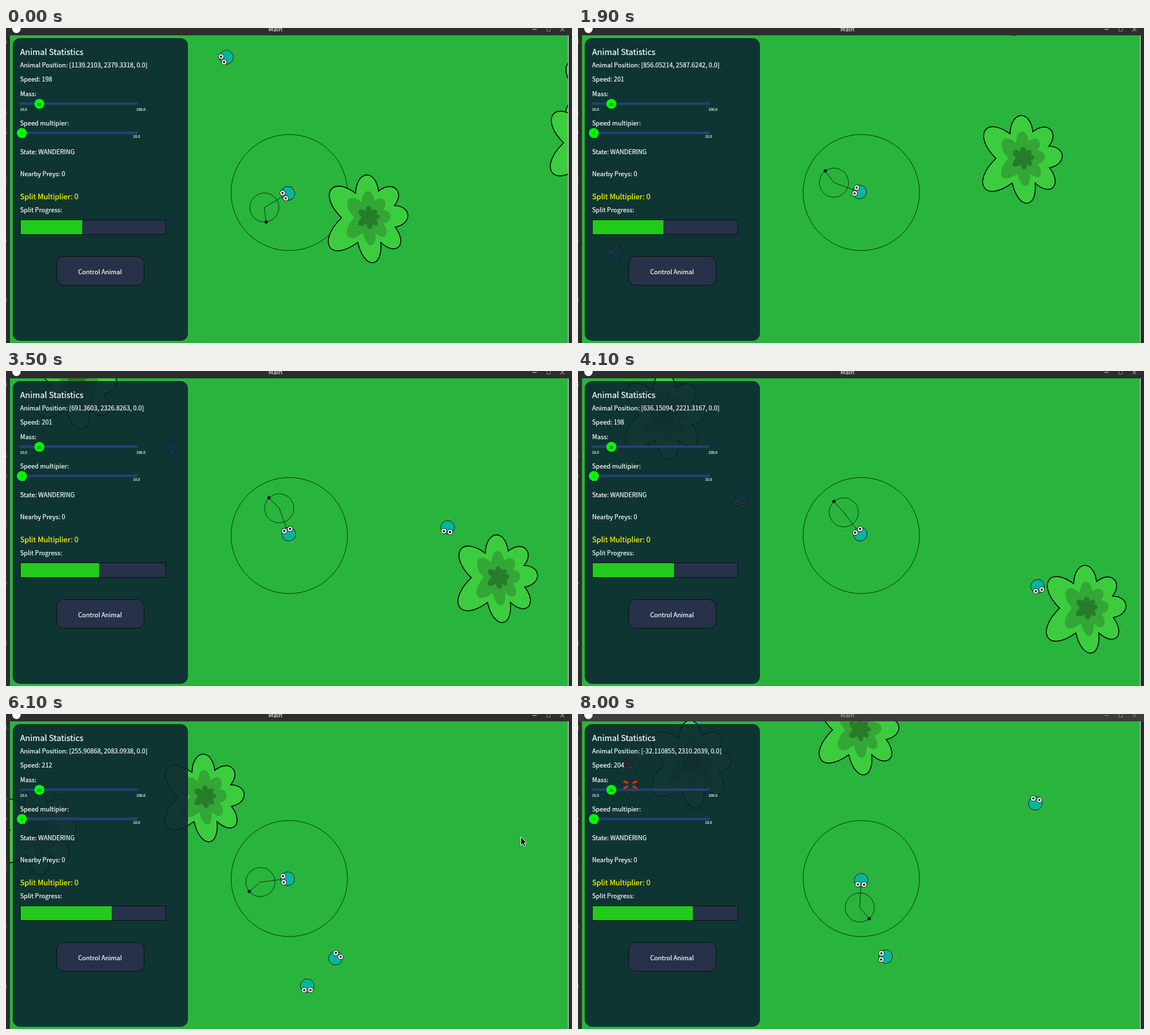
These frames come from a looping animation (1002 px wide and 559 px high, 8100 ms). An HTML page with a canvas:

```html
<!DOCTYPE html>
<html lang="en">
<head>
<meta charset="utf-8">
<title>Main</title>
<style>
html, body { margin: 0; width: 100%; height: 100%; overflow: hidden; background: #2b2b2b; }
canvas { display: block; width: 1002px; height: 559px; }
</style>
</head>
<body>
<canvas id="stage" width="1002" height="559"></canvas>
<script>
const ctx = document.getElementById('stage').getContext('2d');
const LOOP = 8100, STEP = 100, SCALE = 0.515, TAU = Math.PI * 2, RAD = Math.PI / 180;
const CENTER = { x: 501.5, y: 292 };
const FONT = '"Noto Sans CJK SC", "Noto Sans CJK JP", "Noto Sans", sans-serif';
const INK = '#06210a';

// Moments (seconds) at which the paths below have a waypoint
const TIMES = [0, 1.1, 2.8, 4.1, 5.2, 6.1, 8];
const HERO_SPEED = 205;
const heroKeys = [
  { x: 1139.2103, y: 2379.3318, heading: 149, wander: 83, speed: 198 },
  { x: 988.47925, y: 2556.5457, heading: 129, wander: 243, speed: 198 },
  { x: 733.77966, y: 2461.1333, heading: 252, wander: 223, speed: 204 },
  { x: 636.15094, y: 2221.3167, heading: 233, wander: 228, speed: 198 },
  { x: 455.12704, y: 2080.692, heading: 192, wander: 135, speed: 201 },
  { x: 255.90868, y: 2083.0938, heading: 173, wander: 140, speed: 212 },
  { x: -32.110855, y: 2310.2039, heading: 93, wander: 50, speed: 204 }
];
const hero = heroKeys.map((k, i) => ({
  ...k, t: TIMES[i],
  vx: Math.cos(k.heading * RAD) * HERO_SPEED,
  vy: Math.sin(k.heading * RAD) * HERO_SPEED
}));

// Other animals, relative to the nearest bush; the first number is the first waypoint's index
const preys = [
  roam(0, [-253, -284], [-358, -245], [-514, -260], [-612, -192], [-598, -91], [-565, -7], [-700, 60]),
  roam(1, [-650, 213], [-747, 113], [-684, 22], [-579, 9], [-515, -56], [-435, -212]),
  roam(2, [-67, -150], [-88, -38], [-27, 49]),
  roam(5, [-1165, -385], [-1151, -242])
];
const hunter = roam(5, [-1170, -420], [-1158, -280]);
const bushes = [[419, -223], [393, -133], [-745, -343], [-1042, -284], [0, 0]];

// Petals grow longer to the lower left; valleys lie halfway between tips
const TIPS = [-94, -47, -3, 45, 86, 143, 215];
const polar = (deg, r) => [Math.cos(deg * RAD) * r, Math.sin(deg * RAD) * r];
const petals = TIPS.map((a, i) => ({
  tip: polar(a, 78 + 10 * Math.cos((a - 160) * RAD)),
  valley: polar((a + (i ? TIPS[i - 1] : TIPS[6] - 360)) / 2, 49)
}));

// Waypoints with velocities taken from their neighbours
function roam(first, ...points) {
  const nodes = points.map(([x, y], i) => ({ x, y, t: TIMES[first + i] }));
  const last = nodes.length - 1;
  const slope = (i, k) => (nodes[i + 1][k] - nodes[i][k]) / (nodes[i + 1].t - nodes[i].t);
  for (const k of ['x', 'y']) {
    const v = 'v' + k;
    for (let i = 1; i < last; i++) {
      const w = (nodes[i].t - nodes[i - 1].t) / (nodes[i + 1].t - nodes[i - 1].t);
      nodes[i][v] = slope(i - 1, k) * (1 - w) + slope(i, k) * w;
    }
    nodes[0][v] = 2 * slope(0, k) - (last > 1 ? nodes[1][v] : slope(0, k));
    nodes[last][v] = 2 * slope(last - 1, k) - nodes[last - 1][v];
  }
  return nodes;
}

function segment(nodes, t) {
  let i = 0;
  while (i < nodes.length - 2 && t >= nodes[i + 1].t) i++;
  const a = nodes[i], b = nodes[i + 1];
  return { a, b, s: (t - a.t) / (b.t - a.t) };
}

function mix(nodes, key, t) {
  const { a, b, s } = segment(nodes, t);
  return a[key] + (b[key] - a[key]) * s;
}

// Hermite path, carried on straight beyond its ends
function follow(nodes, t) {
  const { a, b, s } = segment(nodes, t);
  if (s < 0 || s > 1) {
    const n = s < 0 ? a : b;
    return { x: n.x + n.vx * (t - n.t), y: n.y + n.vy * (t - n.t), angle: Math.atan2(n.vy, n.vx) };
  }
  const dt = b.t - a.t, s2 = s * s, s3 = s2 * s;
  const axis = k => {
    const d = b[k] - a[k], u = a['v' + k] * dt, v = b['v' + k] * dt;
    return {
      pos: a[k] + d * (3 * s2 - 2 * s3) + u * (s3 - 2 * s2 + s) + v * (s3 - s2),
      vel: d * 6 * (s - s2) + u * (3 * s2 - 4 * s + 1) + v * (3 * s2 - 2 * s)
    };
  };
  const x = axis('x'), y = axis('y');
  return { x: x.pos, y: y.pos, angle: Math.atan2(y.vel, x.vel) };
}

function paint(fill, stroke, width = 1) {
  if (fill) { ctx.fillStyle = fill; ctx.fill(); }
  if (stroke) { ctx.strokeStyle = stroke; ctx.lineWidth = width; ctx.stroke(); }
}

function circle(x, y, r, fill, stroke, width) {
  ctx.beginPath();
  ctx.arc(x, y, r, 0, TAU);
  paint(fill, stroke, width);
}

function rect(x, y, w, h, fill) {
  ctx.fillStyle = fill;
  ctx.fillRect(x, y, w, h);
}

function roundBox(x, y, w, h, fill, stroke) {
  ctx.beginPath();
  ctx.roundRect(x, y, w, h, 12);
  paint(fill, stroke);
}

function line(points, color, width) {
  ctx.beginPath();
  points.forEach(([x, y]) => ctx.lineTo(x, y));
  paint(null, color, width);
}

function text(str, x, y, size = 11.1, color = '#fff', align = 'left') {
  ctx.font = `${size}px ${FONT}`;
  ctx.textAlign = align;
  ctx.fillStyle = ctx.strokeStyle = color;
  ctx.lineWidth = 0.2;
  ctx.fillText(str, x, y);
  ctx.strokeText(str, x, y);
}

function animal(x, y, angle, color = '#07b59b') {
  ctx.save();
  ctx.translate(x, y);
  ctx.rotate(angle);
  line([[-12, 0], [-17, 0.5], [-20, -2]], '#a8922a');
  line([[-16, 0], [-19, 3]], '#a8922a');
  circle(0, 0, 12.2, color, '#0a1c1a', 0.9);
  for (const side of [-5.5, 5.5]) {
    circle(7.5, side, 4.8, '#f4f4f4', '#111', 0.9);
    circle(7.7, side, 1.9, '#000');
  }
  ctx.restore();
}

function flower(sx, sy, fill, stroke) {
  ctx.beginPath();
  petals.forEach(({ tip, valley: [x0, y0] }, i) => {
    const [x1, y1] = petals[(i + 1) % petals.length].valley;
    const cx = (8 * tip[0] - x0 - x1) / 6, cy = (8 * tip[1] - y0 - y1) / 6;
    const dx = (x1 - x0) * 0.42, dy = (y1 - y0) * 0.42;
    if (!i) ctx.moveTo(x0 * sx, y0 * sy);
    ctx.bezierCurveTo((cx - dx) * sx, (cy - dy) * sy, (cx + dx) * sx, (cy + dy) * sy, x1 * sx, y1 * sy);
  });
  ctx.closePath();
  paint(fill, stroke, 1.6);
}

function bush(x, y) {
  ctx.save();
  ctx.translate(x, y);
  flower(1, 1, '#3ccd3e', '#000');
  flower(0.55, 0.62, '#33a635');
  flower(0.27, 0.26, '#277c2a');
  ctx.restore();
}

function drawHero(t, angle) {
  const { x, y } = CENTER, cos = Math.cos(angle), sin = Math.sin(angle);
  const cx = x + cos * 51.5, cy = y + sin * 51.5;
  const [dx, dy] = polar(mix(hero, 'wander', t), 26);
  circle(x, y, 103, null, INK, 0.9);
  circle(cx, cy, 25.8, null, INK, 0.9);
  line([[x, y], [cx, cy], [cx + dx, cy + dy]], INK, 0.9);
  circle(cx + dx, cy + dy, 2.8, '#000');
  animal(x + cos * 3, y + sin * 3, angle);
}

function slider(y, knob, value, min, max, maxX, labelY) {
  rect(24, y - 2.5, 209, 4.5, '#283f70');
  text(min, 25, labelY, 6.3);
  text(max, maxX, labelY, 6.3);
  circle(knob, y, 8.8, '#00ff00');
  text(value, knob, y + 3, 6.3, '#0a3a10', 'center');
}

function panel(t, pos) {
  const num = v => String(+v.toPrecision(8));
  roundBox(12.5, 18.5, 309, 536, 'rgba(13,38,50,0.89)', '#0b2a2a');
  text('Animal Statistics', 25, 48, 14.6);
  text(`Animal Position: [${num(pos.x)}, ${num(pos.y)}, 0.0]`, 25, 69.5);
  text('Speed: ' + Math.round(mix(hero, 'speed', t)), 25, 95);
  text('Mass:', 25, 121);
  slider(134.5, 59, '25', '10.0', '100.0', 231, 147);
  text('Speed multipier:', 25, 172.5);
  slider(186.3, 28, '1', '1.0', '10.0', 225, 194.5);
  text('State: WANDERING', 25, 224);
  text('Nearby Preys: 0', 25, 262.5);
  text('Split Multiplier: 0', 25, 303.5, 13, '#ffff00');
  text('Split Progress:', 25, 327);
  rect(25, 340, 258.5, 27, '#05100f');
  rect(26, 341, 256.5, 25, '#273149');
  rect(26, 341, 109 + t * 8.55, 25, '#22cb1b');
  roundBox(89.5, 405.5, 155, 51, '#273149', '#05100f');
  text('Control Animal', 166.5, 437, 11.1, '#fff', 'center');
}

function angerMark(x, y) {
  for (const sx of [-1, 1]) for (const sy of [-1, 1]) {
    line([[x + sx * 4, y + sy * 3], [x + sx * 12, y + sy * 6]], '#e3260f', 4);
  }
}

function chrome(dimmed) {
  const ink = dimmed ? '#9a9a9a' : '#dedede';
  rect(0, 0, 1002, 13, dimmed ? '#3c3c3c' : '#2d2d2d');
  rect(0, 13, 7, 546, '#2b2b2b');
  rect(0, 262, 2, 18, '#3a3a3a');
  rect(995, 13, 1.2, 546, '#e4ece4');
  rect(996.2, 13, 6, 546, '#2b2b2b');
  circle(18.5, 1.5, 7.5, '#fff');
  text('Main', 477, 6, 11, ink, 'center');
  line([[932, 2.5], [939.5, 2.5]], ink);
  ctx.strokeStyle = '#888';
  ctx.strokeRect(957.5, -0.5, 6, 6);
  line([[981.5, -1], [988.5, 6]], ink);
  line([[988.5, -1], [981.5, 6]], ink);
  // Edge of the editor window behind
  [['i', 28], ['s', 153], ['A', 188], ['y', 381], ['i', 487]].forEach(([c, y]) => text(c, 2, y, 11, '#777', 'right'));
}

function cursor(x, y) {
  ctx.beginPath();
  [[0, 0], [0, 15], [3.5, 12], [6, 17], [8.3, 16], [6, 11], [10, 11]].forEach(([dx, dy]) => ctx.lineTo(x + dx, y + dy));
  ctx.closePath();
  paint('#0a0a0a', '#fff');
}

function render(t) {
  const pos = follow(hero, t);
  // The picture runs slightly ahead of the printed position
  const ahead = follow(hero, t + 0.02);
  const ox = 641.3 - (ahead.x - hero[0].x) * SCALE;
  const oy = 337 - (ahead.y - hero[0].y) * SCALE;
  const place = (nodes, color) => {
    const p = follow(nodes, t);
    animal(ox + p.x, oy + p.y, p.angle, color);
    return p;
  };

  ctx.save();
  ctx.beginPath();
  ctx.rect(7, 13, 988, 546);
  ctx.clip();
  rect(7, 13, 988, 546, '#29b43d');
  drawHero(t, pos.angle);
  const chased = preys.map(nodes => place(nodes)).pop();
  place(hunter, '#d8342a');
  bushes.forEach(([x, y]) => bush(ox + x, oy + y));
  panel(t, pos);
  if (t > 7) angerMark(ox + chased.x - 1, oy + chased.y - 3);
  ctx.restore();

  chrome(t >= 8);
  if (t >= 5.9 && t < 6.8) cursor(911.5 + Math.min(26, Math.max(0, (t - 6.1) * 100)), 218);
}

function tick(now) {
  render(Math.floor(now % LOOP / STEP) * STEP / 1000);
  requestAnimationFrame(tick);
}
requestAnimationFrame(tick);
</script>
</body>
</html>
```
